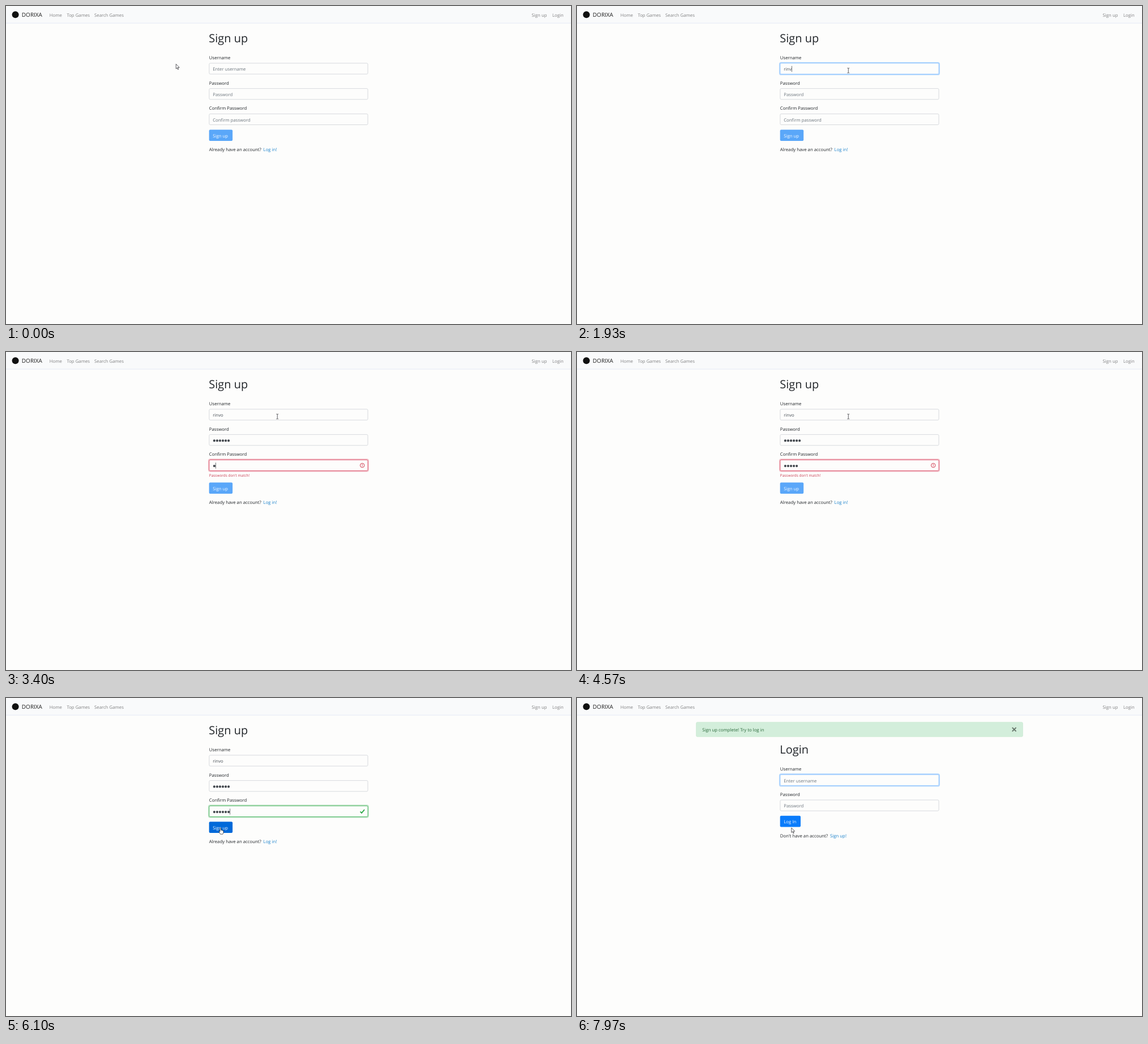
Animation, 998 px wide and 561 px high, one loop 8 s. Source, as an HTML page:

```html
<!DOCTYPE html>
<html lang="en">
<head>
<meta charset="utf-8">
<title>Sign up</title>
<style>
  html, body { margin: 0; width: 100%; height: 100%; overflow: hidden; background: #fdfdfc; }
  svg { display: block; width: 998px; height: 561px; }
  text { font: 7.8px "Open Sans", "Noto Sans", sans-serif; fill: #212529; text-rendering: geometricPrecision; white-space: pre; }
  .nav { fill: #808182; }
  .brand { font-size: 10px; fill: #1b1b1b; }
  .title { font-size: 20px; }
  .hint { fill: #6c757d; }
  .value { fill: #495057; }
  .link { fill: #1b82cb; }
  .onBtn { fill: #f4f9ff; }
  .error { font-size: 6.45px; fill: #c93a50; }
  .notice { fill: #2a683a; }
</style>
</head>
<body>
<svg id="stage" viewBox="0 0 998 561"></svg>
<script>
const LOOP = 8000, BLINK = 530, FADE = 150;
const NAME = 'rinvo';

// Moments of the story, in ms
const CLICK_NAME = 1050, TAB_PASS = 2300, TAB_CONFIRM = 3200, SUBMIT = 6170, LOGIN = 6380;
const HOVER = 5890, REFRESH = 7000;
const nameKeys = [1530, 1640, 1750, 1870, 1990];
const passKeys = [2520, 2620, 2730, 2840, 2950, 3060];
const confirmKeys = [3380, 3480, 3580, 3690, 3800, 4620];
const BAD = passKeys[0], GOOD = confirmKeys[5];

const GRAY = [206, 210, 214], SKY = [128, 189, 255], BLUE = [0, 123, 255],
      RED = [214, 50, 80], GREEN = [40, 167, 69];

const stage = document.getElementById('stage');

function add(parent, tag, attrs, text) {
  const node = document.createElementNS('http://www.w3.org/2000/svg', tag);
  set(node, attrs);
  if (text) node.textContent = text;
  parent.appendChild(node);
  return node;
}
function set(node, attrs) {
  for (const key in attrs) node.setAttribute(key, attrs[key]);
}
const show = (node, on) => set(node, { visibility: on ? 'inherit' : 'hidden' });
const group = parent => add(parent, 'g', {});
const label = (parent, x, y, text, cls = '') => add(parent, 'text', { x, y, class: cls }, text);
const box = (parent, x, y, width, height, attrs) =>
  add(parent, 'rect', { x, y, width, height, rx: 2, ...attrs });

const clamp = v => Math.min(1, Math.max(0, v));
const ramp = (t, start) => clamp((t - start) / FADE);
const smooth = v => v * v * (3 - 2 * v);
const mix = (a, b, k) => a.map((v, i) => v + (b[i] - v) * k);
const rgb = c => `rgb(${c.map(Math.round)})`;
const typed = (keys, t) => keys.filter(k => k <= t).length;

function caretOn(t, from, to, keys = []) {
  if (t < from || t >= to) return false;
  const last = Math.max(from, ...keys.filter(k => k <= t));
  return (t - last) % (2 * BLINK) < BLINK;
}

function field(parent, y, name, hint) {
  label(parent, 358.8, y - 6.8, name);
  const ring = box(parent, 357.8, y - .8, 282.4, 21.4, { fill: 'none', 'stroke-width': 1.7, rx: 2.8 });
  const frame = box(parent, 358.9, y + .3, 280.2, 19.2, { fill: '#fdfdfc', 'stroke-width': .8 });
  const hintText = label(parent, 365.2, y + 13.6, hint, 'hint');
  const value = label(parent, 365.2, y + 13.6, '', 'value');
  const dots = Array.from({ length: 6 }, (_, i) =>
    add(parent, 'circle', { cx: 367.9 + i * 5.05, cy: y + 11.1, r: 2.05, fill: '#41464c' }));
  const caret = add(parent, 'rect', { y: y + 5.2, width: .7, height: 10.4, fill: '#33383d' });

  return ({ focus = 0, text = '', count = 0, cursor = false, base = GRAY, edge = SKY, glow = BLUE }) => {
    set(ring, { stroke: rgb(glow), 'stroke-opacity': .3 * focus });
    set(frame, { stroke: rgb(mix(base, edge, focus)) });
    show(hintText, !text && !count);
    value.textContent = text;
    dots.forEach((dot, i) => show(dot, i < count));
    const width = text ? value.getComputedTextLength() : count * 5.05;
    set(caret, { x: 365.1 + width });
    show(caret, cursor);
  };
}

// Navigation bar
add(stage, 'rect', { width: 998, height: 561, fill: '#fdfdfc' });
add(stage, 'rect', { width: 998, height: 30, fill: '#f9fafb' });
add(stage, 'rect', { y: 29.6, width: 998, height: 1.2, fill: '#e9eef7' });
add(stage, 'circle', { cx: 16.6, cy: 15.2, r: 6, fill: '#111' });
label(stage, 27.8, 19.3, 'DORIXA', 'brand');
[[76.8, 'Home'], [107.4, 'Top Games'], [156, 'Search Games'], [928.6, 'Sign up'], [965, 'Login']]
  .forEach(([x, text]) => label(stage, x, 18.8, text, 'nav'));

// Sign up page
const signup = group(stage);
label(signup, 358.3, 63.9, 'Sign up', 'title');
const nameField = field(signup, 100.6, 'Username', 'Enter username');
const passField = field(signup, 145.3, 'Password', 'Password');
const confirmField = field(signup, 190, 'Confirm Password', 'Confirm password');

const errorMark = group(signup);
add(errorMark, 'circle', { cx: 629.3, cy: 200, r: 3.7, fill: 'none', stroke: '#d23a50', 'stroke-width': 1 });
add(errorMark, 'path', { d: 'M629.3 197.8v2.6m0 .8v1', stroke: '#d23a50', 'stroke-width': 1 });
label(errorMark, 358.8, 219.6, "Passwords don't match!", 'error');
const okMark = add(signup, 'path', {
  d: 'M625.7 200.3l2.5 2.6 5-6', fill: 'none', stroke: '#28a745', 'stroke-width': 1.7
});

const lower = group(signup);
const btnRing = box(lower, 357.9, 217.4, 43.2, 21.4, { fill: 'none', stroke: '#007bff', 'stroke-width': 1.7, rx: 2.8 });
const btn = box(lower, 358.7, 218.3, 41.5, 19.8);
label(lower, 365.2, 231.8, 'Sign up', 'onBtn');
label(lower, 358.8, 256.1, 'Already have an account?');
label(lower, 454.6, 256.1, 'Log in!', 'link');

// Login page
const login = group(stage);
const notice = group(login);
box(notice, 210.6, 42.3, 576.8, 25.6, { fill: '#d3eedb', stroke: '#c3e6cb', 'stroke-width': .6 });
label(notice, 221.2, 58.7, 'Sign up complete! Try to log in', 'notice');
add(notice, 'path', { d: 'M768.8 51.7l6.8 6.8m0-6.8l-6.8 6.8', stroke: '#68776c', 'stroke-width': 2 });
label(login, 358.3, 98.2, 'Login', 'title');
const loginName = field(login, 134.9, 'Username', 'Enter username');
const loginPass = field(login, 179.6, 'Password', 'Password');
box(login, 358.7, 207.8, 36.3, 19.8, { fill: '#0a7cfb' });
label(login, 365.2, 221.3, 'Log In', 'onBtn');
label(login, 358.8, 245.8, "Don't have an account?");
label(login, 447, 245.8, 'Sign up!', 'link');

// Pointers, each with its hot spot at 0,0
const pointer = group(stage);
const shape = (d, attrs) => add(pointer, 'path', {
  d, fill: '#fff', stroke: '#2b2b2f', 'stroke-width': .75, 'stroke-linejoin': 'round', ...attrs
});
const pointers = {
  arrow: shape('M0 0V8.3L1.9 6.6 3.2 9.7 4.5 9.1 3.2 6.1H5.9Z'),
  beam: shape('M-1.9-4.2H-.5L0-3.8.5-4.2H1.9M0-3.8V3.8M-1.9 4.2H-.5L0 3.8.5 4.2H1.9', { fill: 'none' }),
  hand: shape('M-.9.8Q0-.6.9.8V4.3Q1.9 3.6 2.6 4.6 3.4 4 4 5 5 4.6 5.2 5.8V8.4Q5 10 4.2 11.2H-.2Q-1 9.6-2.9 6.6-2.7 5.4-.9 7Z')
};

const START = [300.3, 102.4], FIELD = [479.3, 113.8], BUTTON = [378.8, 229];
function mouse(t) {
  return t < 5400
    ? mix(START, FIELD, smooth(clamp((t - 30) / 800)))
    : mix(FIELD, BUTTON, smooth(clamp((t - 5400) / 600)));
}
function pointerKind(x, y, t) {
  if (t >= LOGIN) return 'arrow';
  if (x > 358.7 && x < 400.2 && y > 218.3 && y < 238.1) return 'hand';
  const inField = [100.6, 145.3, 190].some(top => y > top && y < top + 19.8);
  return inField && x > 358.7 && x < 639.3 ? 'beam' : 'arrow';
}

function draw(t) {
  const bad = ramp(t, BAD), good = ramp(t, GOOD);
  const tone = plain => mix(mix(plain, RED, bad), GREEN, good);
  const wrong = t >= BAD && t < GOOD;

  show(signup, t < LOGIN);
  nameField({
    focus: ramp(t, CLICK_NAME) - ramp(t, TAB_PASS),
    text: NAME.slice(0, typed(nameKeys, t)),
    cursor: caretOn(t, CLICK_NAME, TAB_PASS, nameKeys)
  });
  passField({
    focus: ramp(t, TAB_PASS) - ramp(t, TAB_CONFIRM),
    count: typed(passKeys, t),
    cursor: caretOn(t, TAB_PASS, TAB_CONFIRM, passKeys)
  });
  confirmField({
    focus: ramp(t, TAB_CONFIRM) - ramp(t, SUBMIT),
    count: typed(confirmKeys, t),
    cursor: caretOn(t, TAB_CONFIRM, SUBMIT, confirmKeys),
    base: tone(GRAY), edge: tone(SKY), glow: tone(BLUE)
  });
  show(errorMark, wrong);
  show(okMark, t >= GOOD);
  set(lower, { transform: `translate(0 ${wrong ? 12 : 0})` });
  set(btn, { fill: t < GOOD ? '#5aa7f9' : rgb(mix(BLUE, [0, 105, 217], ramp(t, HOVER))) });
  set(btnRing, { 'stroke-opacity': .4 * ramp(t, SUBMIT) });

  show(login, t >= LOGIN);
  set(notice, { transform: `translate(0 ${t < REFRESH ? 0 : .4})` });
  loginName({ focus: ramp(t, LOGIN), cursor: caretOn(t, LOGIN, LOOP) });
  loginPass({});

  const [x, y] = mouse(t), kind = pointerKind(x, y, t);
  set(pointer, { transform: `translate(${x} ${y})` });
  for (const key in pointers) show(pointers[key], key === kind);
}

const begin = performance.now();
function tick() {
  draw((performance.now() - begin) % LOOP);
  requestAnimationFrame(tick);
}
tick();
</script>
</body>
</html>
```
